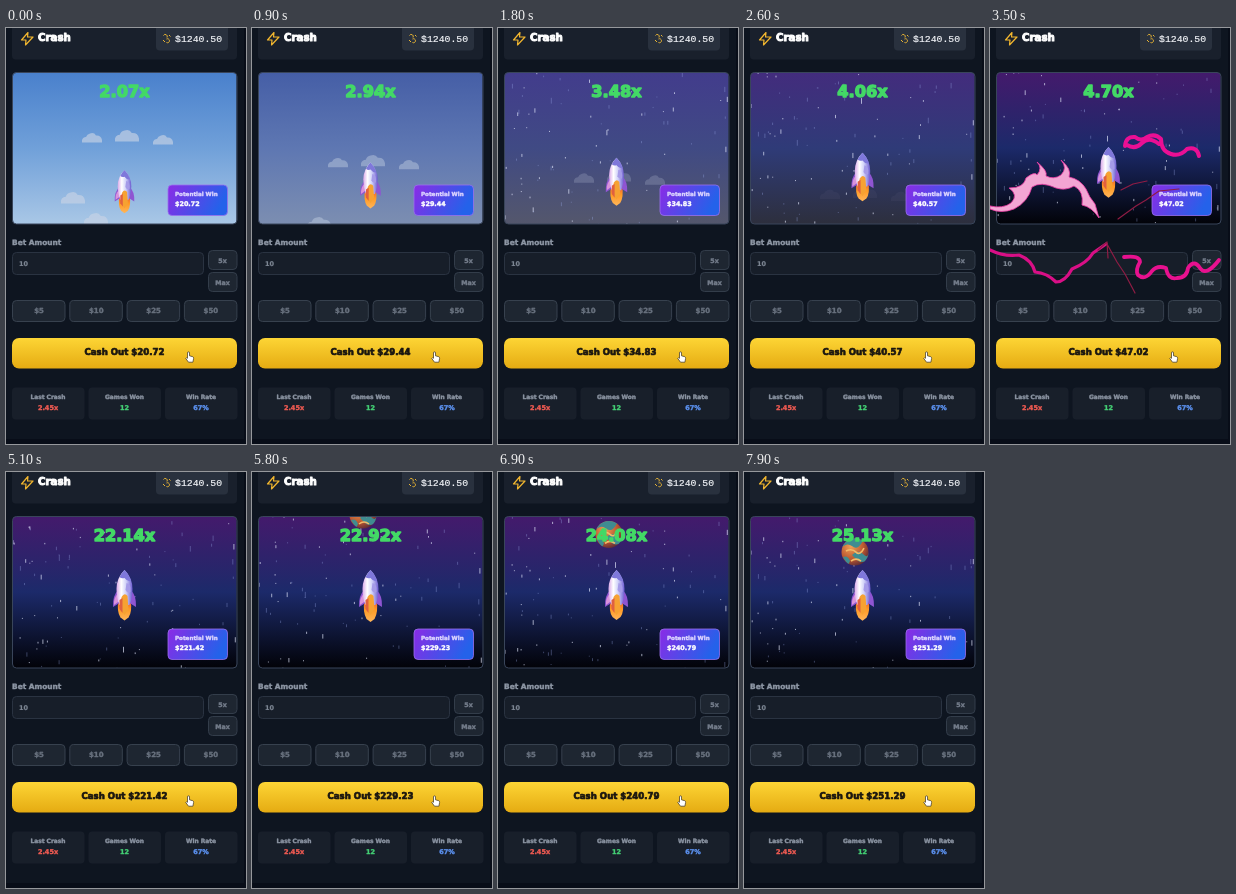
An HTML page for the animation above (8 s loop, 240 by 416 pixels).

```html
<!DOCTYPE html>
<html lang="en">
<head>
<meta charset="utf-8">
<title>Crash</title>
<style>
html, body { margin: 0; width: 100%; height: 100%; overflow: hidden; background: #080d18; }
svg { display: block; width: 100vw; height: 100vh; }
text { font-family: "DejaVu Sans", Verdana, sans-serif; font-weight: 700; stroke-linejoin: round; }
.mono { font-family: "Liberation Mono", monospace; font-weight: 400; }
</style>
</head>
<body>
<svg id="stage" viewBox="0 0 240 416">
  <defs>
    <linearGradient id="sky" x2="0" y2="1"><stop/><stop offset=".5"/><stop offset="1"/></linearGradient>
    <linearGradient id="win" x2="1" y2=".3"><stop stop-color="#8b2be6"/><stop offset="1" stop-color="#2462ea"/></linearGradient>
    <linearGradient id="gold" x2="0" y2="1"><stop stop-color="#fdd535"/><stop offset="1" stop-color="#e5ab12"/></linearGradient>
    <linearGradient id="hull"><stop stop-color="#d9a8ea"/><stop offset=".3" stop-color="#fff"/><stop offset=".6" stop-color="#cfd0f8"/><stop offset="1" stop-color="#6c5bd0"/></linearGradient>
    <linearGradient id="fire" x2="0" y2="1"><stop stop-color="#e8563a"/><stop offset=".45" stop-color="#ff9a24"/><stop offset="1" stop-color="#ffb65a"/></linearGradient>
    <radialGradient id="globe" cx=".35" cy=".3" r=".8"><stop stop-color="#f0a055"/><stop offset=".6" stop-color="#b9552f"/><stop offset="1" stop-color="#4a2438"/></radialGradient>
    <clipPath id="view"><rect x="6.5" y="44.5" width="224" height="151.5" rx="4"/></clipPath>
    <clipPath id="disc"><circle r="13.5"/></clipPath>
    <path id="cloud" d="M-10 4.5V2Q-9-1-6-1Q-5-4-2-4.5Q2-6 4-2.5Q9-3 10 2V4.5Z"/>
  </defs>
  <rect width="240" height="416" fill="#080d18"/>
  <rect width="238" height="411" fill="#0e1520"/>
  <g id="panel"></g>
  <g clip-path="url(#view)">
    <rect x="6" y="44" width="225" height="152" fill="url(#sky)"/>
    <path id="stars" stroke="#e8ecff" stroke-width=".9" fill="none"/>
    <path id="faintStars" stroke="#9db0ee" stroke-width=".7" fill="none"/>
    <g id="clouds" fill="#c8d3e5"></g>
    <g id="planet">
      <circle r="13.5" fill="url(#globe)"/>
      <g clip-path="url(#disc)">
        <path d="M-14-4Q-8-10-3-6T6-8L10-14H-8ZM-3 3Q3-3 8 2T14 0V8Q6 12 2 8ZM-12 5Q-7 3-5 9L-7 13Z" fill="#3f8c91"/>
        <path d="M-9-1Q-3-4 1 0T9-4M-4 9Q1 5 6 9" stroke="#f3bb69" stroke-width="1.6" fill="none"/>
      </g>
    </g>
    <g id="rocket">
      <path id="flame" fill="url(#fire)"/>
      <path d="M-6 20Q-12 25-11.5 37L-5 33ZM6 20Q12 25 11.5 37L5 33Z" fill="#8f55d2"/>
      <path d="M-7 24Q-11 28-10.5 35L-5 31Z" fill="#d993dc"/>
      <path d="M0 0Q8 8 8 19Q8 28 5 35H-5Q-8 28-8 19Q-8 8 0 0Z" fill="url(#hull)"/>
      <path d="M0 0Q5 5 6.500 11Q3 12 0 8Q-3 9-5 7Q-3 3 0 0Z" fill="#7f78da"/>
      <path d="M2 13Q7 14 6 22Q3 24 1 20Z" fill="#a59be8"/>
      <path d="M-3 27Q0 22 3 26L4 39L0 45L-4 39Z" fill="#f6a232"/>
      <path d="M-5 30L-2 28V43L-5 39Z" fill="#e0603f"/>
    </g>
  </g>
  <rect x="6.5" y="44.5" width="224.5" height="151.5" rx="4" fill="none" stroke="#39455a"/>
  <g id="labels"></g>
  <path d="M181.500 325q0-1.200 1-1.200t1 1.200v2.800l3.200.9q1.100.5.900 1.800l-.7 3.700h-4.400l-2.700-3.700q.5-1.300 1.700-.2Z" fill="#fff" stroke="#3a3020" stroke-width=".7"/>
  <g id="bolts" stroke-linejoin="round" stroke-linecap="round"></g>
</svg>
<script>
const $ = id => document.getElementById(id);
const LOOP = 8000, CUT = 3800;

function add(parent, tag, attrs, content = '') {
  const el = document.createElementNS('http://www.w3.org/2000/svg', tag);
  for (const key in attrs) el.setAttribute(key, attrs[key]);
  el.textContent = content;
  return $(parent).appendChild(el);
}
const box = (x, y, width, height, fill, stroke = 'none', rx = 4) =>
  add('panel', 'rect', { x, y, width, height, fill, stroke, rx });
const label = (content, x, y, size, fill, anchor = 'middle', weight = .4) =>
  add('labels', 'text', { x, y, 'font-size': size, fill, stroke: fill, 'stroke-width': weight, 'text-anchor': anchor }, content);

// Header
box(6, -8, 225, 39.5, '#19202c');
box(150, -6, 72, 28.5, '#29313e');
add('labels', 'path', { d: 'M22 4.5L15.5 12H20L19.5 17L27 9H21.5Z', fill: 'none', stroke: '#f3b72f', 'stroke-width': 1.2, 'stroke-linejoin': 'round' });
add('labels', 'path', { d: 'M157.5 7.500a2 2 0 1 1 3.500 2M160.500 11a2 2 0 1 1 0 3.500M157 12l2 2M163 7l1.500 1.500', fill: 'none', stroke: '#e9b534' });
label('Crash', 32, 13.3, 10.2, '#fff', 'start', 1);
label('$1240.50', 169, 14, 9.8, '#f4f6fa', 'start', .2).setAttribute('class', 'mono');

// Controls
label('Bet Amount', 6, 217, 7.4, '#8e97a5', 'start');
box(6.5, 224.5, 191, 22, '#171e29', '#2a3341');
label('10', 13, 238, 6.5, '#7c8592', 'start', .2);
[['5x', 222.5], ['Max', 244.5]].forEach(([name, y]) => {
  box(202.5, y, 28.5, 19, '#1e2631', '#333d4a');
  label(name, 216.5, y + 12, 6.3, '#747d8b');
});
['$5', '$10', '$25', '$50'].forEach((name, i) => {
  box(6.5 + i * 57.3, 272.5, 52.5, 21, '#1e2631', '#37414e');
  label(name, 33 + i * 57.3, 285, 7, '#68717e');
});
box(6, 310, 225, 30.5, 'url(#gold)', 'none', 7);
[['Last Crash', '2.45x', '#ef5a52'], ['Games Won', '12', '#43cf74'], ['Win Rate', '67%', '#5a8fec']].forEach(([name, value, color], i) => {
  box(6 + i * 76.5, 359.5, 72.5, 32, '#181f2a');
  label(name, 42 + i * 76.5, 371, 5.9, '#8b94a2');
  label(value, 42 + i * 76.5, 382, 6.5, color);
});

// Live values
add('labels', 'rect', { x: 162, y: 157, width: 59.5, height: 30.5, rx: 4, fill: 'url(#win)', stroke: '#9a70ee', 'stroke-width': .8 });
label('Potential Win', 169, 168, 5.6, '#ddd5ff', 'start');
const payout = label('', 169, 178, 6.4, '#fff', 'start');
const multiplier = label('', 118.5, 69, 16.2, '#43d966', 'middle', 1.4);
const cashOut = label('', 118.5, 327, 8.6, '#1b1710', 'middle', .7);

[[86, 110, 1], [121, 108, 1.2], [157, 112, 1], [67, 170, 1.2], [90, 191, 1.2]].forEach(([x, y, s]) =>
  add('clouds', 'use', { href: '#cloud', transform: `translate(${x} ${y}) scale(${s})` }));

let seed = 17;
const random = () => (seed = seed * 16807 % 2147483647) / 2147483647;
const stars = Array.from({ length: 95 }, () => ({
  x: 7 + random() * 223, y: random() * 160, size: 1 + random() ** 3 * 5, speed: 25 + random() * 45
}));

// Energy streaks: path, stroke, width, pulse growth, fill
const bolts = [
  ['M0 178Q13 181 21 175Q29 167 19 160Q34 160 36 150Q45 143 47 147Q53 140 47 134Q58 143 56 148Q64 152 71 147Q78 140 71 132Q82 141 79 149Q90 151 96 161Q99 169 105 176L109 190Q102 179 92 177Q94 163 84 158Q76 163 66 160Q51 153 42 159Q38 174 24 181Q11 186 0 181Z', '#f23ca8', .8, 10, '#f3a5d3'],
  ['M135 118Q136 108 145 109Q151 114 157 109Q165 105 171 111Q171 123 181 126Q190 129 197 121Q207 118 209 128M137 117Q145 122 152 115T169 116', '#ea0f94', 4, 10],
  ['M0 222Q14 229 29 227Q42 232 45 244Q57 245 66 254Q75 254 82 241Q97 235 103 225L116 216', '#d90f86', 3.2, 12],
  ['M134 229Q150 227 150 234Q145 242 148 247Q155 253 162 243Q167 237 176 240Q178 252 187 250Q197 250 198 240Q204 231 210 240T229 232', '#e8118f', 3.8, 12],
  ['M128 191l18-13 10-6 13-9 20-2M117 216l10 18 8 12 10 19M108 222l9-8 1 16M131 162l12-6 14-3', '#8f1c44', 1.2, 2]
].map(([d, stroke, width, growth, fill = 'none']) => ({
  width, growth, el: add('bolts', 'path', { d, stroke, fill, pathLength: 100 })
}));

const clamp = (v, lo = 0, hi = 1) => Math.min(hi, Math.max(lo, v));
const mix = (a, b, k) => a + (b - a) * k;
function track(keys, x) {
  let i = 0;
  while (i < keys.length - 2 && x >= keys[i + 1][0]) i++;
  const [x0, a] = keys[i], [x1, b] = keys[i + 1], k = clamp((x - x0) / (x1 - x0));
  return Array.isArray(a) ? a.map((v, j) => mix(v, b[j], k)) : mix(a, b, k);
}

const before = [[0, 2.072], [900, 2.944], [1800, 3.483], [3500, 4.702], [CUT, 4.917]];
const after = [[CUT, 20.692], [4400, 21.361], [5800, 22.923], [7900, 25.129]];
const skyKeys = [
  [[2.07, [73, 128, 204]], [2.94, [69, 94, 166]], [3.48, [66, 60, 140]], [4.7, [68, 26, 108]]],
  [[2.07, [112, 160, 217]], [2.94, [94, 119, 178]], [3.48, [64, 74, 132]], [4.7, [28, 42, 106]]],
  [[2.07, [169, 199, 230]], [2.94, [124, 142, 178]], [3.48, [84, 87, 108]], [4.7, [2, 3, 8]]]
];
const skyStops = $('sky').children;
const move = (id, x, y, s = 1) => $(id).setAttribute('transform', `translate(${x} ${y}) scale(${s})`);

function drawStars(id, list, t, opacity) {
  $(id).setAttribute('d', list.map(s =>
    `M${s.x.toFixed(1)} ${(40 + (s.y + s.speed * t / 1000) % 160).toFixed(1)}v${s.size.toFixed(1)}`).join(''));
  $(id).setAttribute('opacity', opacity);
}

function drawBolts(t) {
  const reveal = clamp((t - 3100) / 400);
  const pulse = t < CUT ? clamp((t - 3500) / 300) : clamp((4300 - t) / 500);
  $('bolts').style.display = t >= 3100 && t < 4300 ? '' : 'none';
  for (const { el, width, growth } of bolts) {
    const base = t < CUT ? width : width * pulse;
    el.setAttribute('stroke-width', base + growth * pulse);
    el.setAttribute('stroke-dasharray', `${100 * reveal} 200`);
    el.setAttribute('fill-opacity', t < CUT ? reveal : pulse);
  }
}

function draw(t) {
  const m = track(t < CUT ? before : after, t);
  const cash = '$' + (m * 10).toFixed(2);
  multiplier.textContent = m.toFixed(2) + 'x';
  payout.textContent = cash;
  cashOut.textContent = 'Cash Out ' + cash;

  skyKeys.forEach((keys, i) => skyStops[i].setAttribute('stop-color', `rgb(${track(keys, m).map(Math.round)})`));
  const night = clamp((m - 2.94) / .5);
  drawStars('stars', stars.slice(0, 45), t, night * .75);
  drawStars('faintStars', stars.slice(45), t, night * .5);

  move('clouds', 0, 28.5 * (m - 2.072));
  $('clouds').setAttribute('opacity', track([[2.07, .65], [2.94, .42], [3.48, .22], [4.2, 0]], m));
  move('planet', 111, 43 + 16.8 * (m - 22.923));

  const climb = clamp((m - 2.072) / 2.63);
  move('rocket', 118.5, Math.max(98, 142 - 8.7 * (m - 2.072)), .85 + .15 * climb);
  const tip = 51 + Math.sin(t / 70);
  $('flame').setAttribute('d', `M-6 30Q-8 42-4 ${tip - 3}L0 ${tip}L4 ${tip - 3}Q8 42 6 30Z`);
  drawBolts(t);
}

function tick(now) {
  draw(Math.floor(now % LOOP / 100) * 100);
  requestAnimationFrame(tick);
}
draw(0);
requestAnimationFrame(tick);
</script>
</body>
</html>
```
